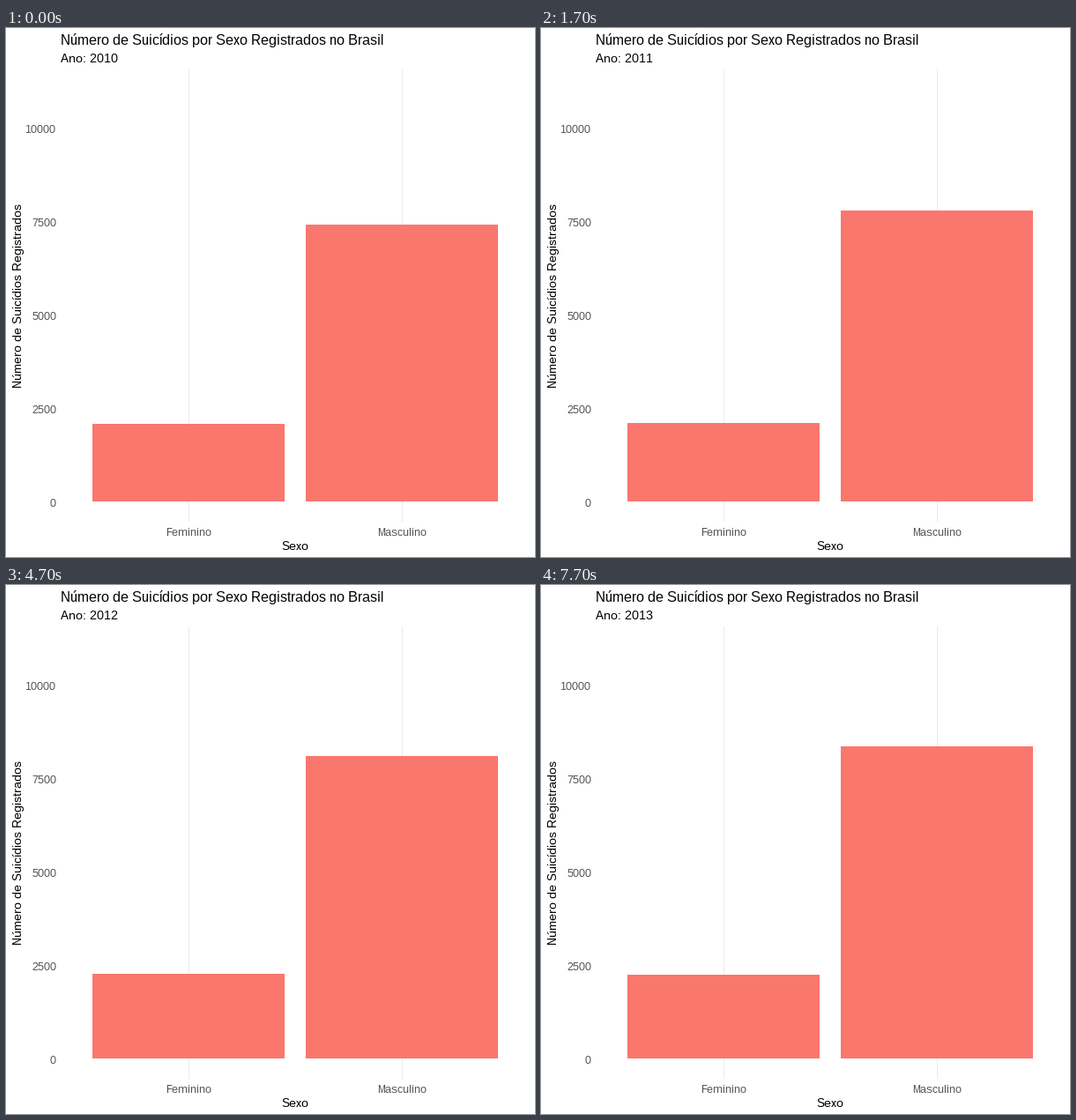
Write a matplotlib script that moves like this. It is 600 px wide and 600 px high and loops after 8 s.

```python
import matplotlib as mpl
import matplotlib.pyplot as plt
from matplotlib.animation import FuncAnimation
from matplotlib.patches import Rectangle

SIZE, DPI = 600, 100
STEP_MS, FRAMES = 100, 80
FIRST_MOVE, PERIOD, TWEEN, STEPS = 500, 3000, 300, 5

BASE = 537            # y of the zero line
BAR_W = 218
HOLD, MOVING = "#FA776E", "#F7766C"

# Bar tops in pixels for 2010 to 2013
FEMALE = (448.6, 447.55, 440.7, 442.2)
MALE = (223.2, 206.9, 193.8, 182.7)

# Whole-pixel glyph advances without kerning
mpl.rcParams.update({
    "font.family": "Liberation Sans",
    "text.hinting": "native",
    "text.hinting_factor": 1,
    "text.kerning_factor": 6,
    "toolbar": "None",
})

fig = plt.figure(figsize=(SIZE / DPI, SIZE / DPI), dpi=DPI, facecolor="white")
ax = fig.add_axes([0, 0, 1, 1])
ax.set_xlim(0, SIZE)
ax.set_ylim(SIZE, 0)
ax.axis("off")


def box(x, y, w, h, color, z):
    return ax.add_patch(Rectangle((x, y), w, h, facecolor=color, linewidth=0,
                                  antialiased=False, zorder=z))


def label(x, y, s, px, color="black", ha="left", **kw):
    return ax.text(x, y, s, fontsize=px * 72 / DPI, color=color, ha=ha,
                   va="baseline", **kw)


for x, name in ((207, "Feminino"), (449, "Masculino")):
    box(x, 47, 1, 513, "#EBEBEB", 1)
    label(x, 576, name, 12, "#4D4D4D", "center")

for i in range(5):
    label(57, 543 - 106 * i, str(2500 * i), 12, "#4D4D4D", "right")

label(62, 19, "Número de Suicídios por Sexo Registrados no Brasil", 16)
subtitle = label(62, 39, "", 14)
label(328, 592, "Sexo", 14, ha="center")
label(18, 303.5, "Número de Suicídios Registrados", 14, ha="center",
      rotation=90, rotation_mode="anchor")

bars = [(box(98, BASE, BAR_W, 0, HOLD, 2), FEMALE),
        (box(340, BASE, BAR_W, 0, HOLD, 2), MALE)]


def progress(t):
    """Return the starting year index and the tween step reached at t ms."""
    if t < FIRST_MOVE:
        return 0, 0
    k, u = divmod(t - FIRST_MOVE, PERIOD)
    return k, min(STEPS, u // TWEEN + 1)


def update(frame):
    k, step = progress(frame * STEP_MS)
    color = MOVING if 0 < step < STEPS else HOLD
    for bar, tops in bars:
        top = round(tops[k] + (tops[k + 1] - tops[k]) * step / STEPS)
        bar.set_y(top)
        bar.set_height(BASE - top)
        bar.set_facecolor(color)
    subtitle.set_text(f"Ano: {2010 + k + (step >= STEPS - 1)}")
    return [bar for bar, _ in bars] + [subtitle]


anim = FuncAnimation(fig, update, frames=FRAMES, interval=STEP_MS,
                     init_func=lambda: update(0), repeat=True, repeat_delay=0)
plt.show()
```
